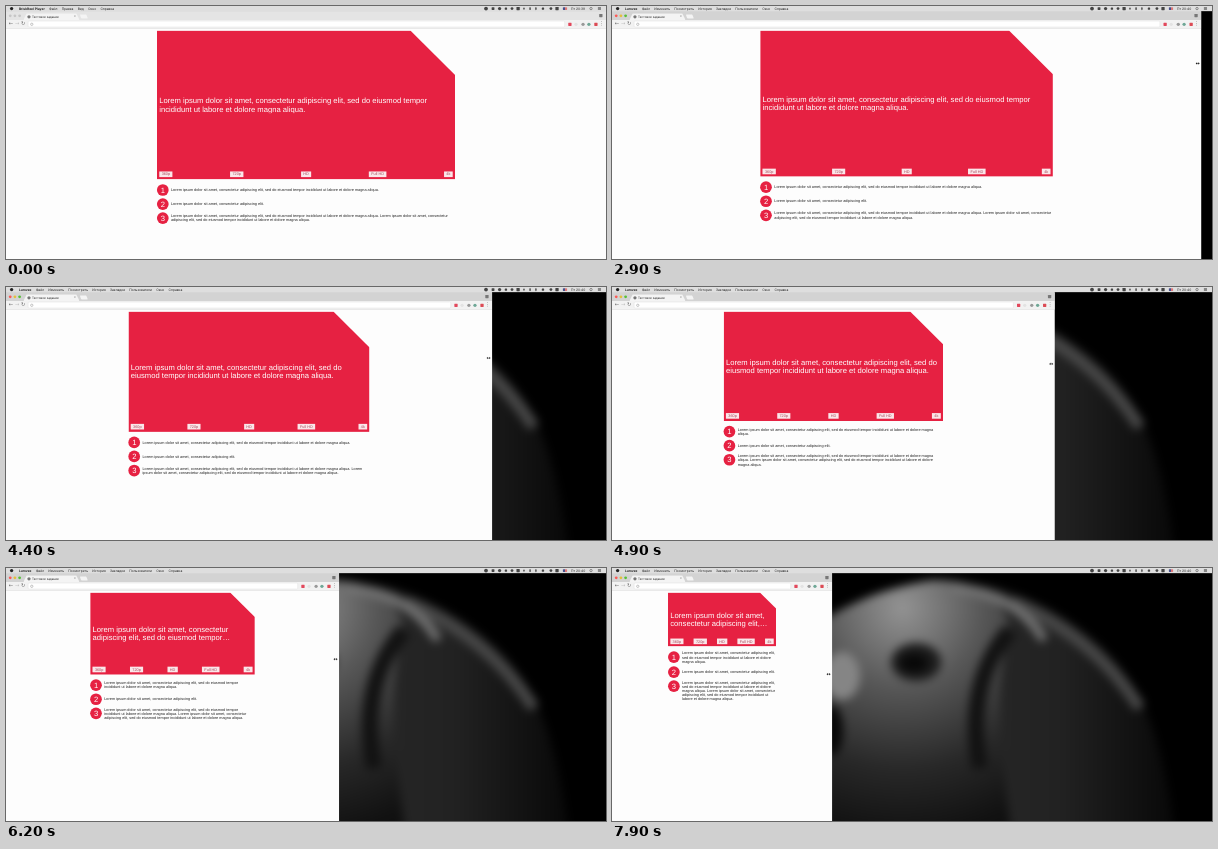
Recreate the animation shown at these times as an HTML page. Size 600x253 px, loop 8 s.

```html
<!DOCTYPE html>
<html lang="ru">
<head>
<meta charset="utf-8">
<style>
  html, body { margin: 0; width: 600px; height: 253px; overflow: hidden; background: #000; }
  /* The desktop is laid out at 2560 x 1080 and scaled down to the stage. */
  #desktop { position: absolute; width: 2560px; height: 1080px; transform: scale(.234375); transform-origin: 0 0;
    overflow: hidden; font: 14px/22px Inter, sans-serif; color: #222; text-rendering: geometricPrecision; }
  #desktop i { position: absolute; display: block; }
  #photo { position: absolute; width: 2560px; height: 1080px; }

  #menubar { position: absolute; width: 100%; height: 22px; background: #dedede; white-space: nowrap; }
  #menus { position: absolute; left: 55px; display: flex; gap: 18px; }
  #menus :first-child { font-weight: 700; }
  #clock { position: absolute; left: 2411px; }
  .dot { width: 14px; height: 14px; border-radius: 50%; transform: translate(-50%, -50%); }
  .square { border-radius: 2px; }

  #window { position: absolute; top: 22px; bottom: 0; background: #fdfdfd; overflow: hidden; }
  #tabs { position: relative; height: 38px; background: #e4e4e4; }
  .active #tabs { background: #d3d3d3; }
  #tabs .light { width: 12px; height: 12px; background: #c6c6c6; }
  .active #tabs .light { background: var(--c); }
  #tab, #plus { position: absolute; background: #f4f4f4; }
  #tab { left: 74px; top: 9px; width: 240px; height: 29px; clip-path: polygon(6% 0, 94% 0, 100% 100%, 0 100%); }
  #tab span { position: absolute; left: 37px; top: 4px; font-size: 13px; white-space: nowrap; }
  #tab b { position: absolute; right: 16px; top: 3px; font-weight: 400; color: #666; }
  #plus { left: 318px; top: 14px; width: 28px; height: 17px; transform: skewX(20deg); border-radius: 3px; }
  #tools { position: relative; height: 36px; background: #f2f2f2; border-bottom: 1px solid #b9b9b9; box-sizing: border-box;
    font: 22px/34px "DejaVu Sans", sans-serif; color: #666; }
  #tools span { position: absolute; }
  #address { position: absolute; left: 94px; right: 176px; top: 4px; height: 26px; background: #fff; border: 1px solid #ccc;
    box-sizing: border-box; border-radius: 4px; }
  #address i { left: 9px; top: 7px; width: 8px; height: 8px; border: 2px solid #888; border-radius: 50%; }

  #page { width: calc(50% - 8px); margin: 8px auto; font: 16.3px/18px "Liberation Sans", Arial, sans-serif; }
  #card { position: relative; aspect-ratio: 2; background: #e62142; margin-bottom: 20px;
    clip-path: polygon(0 0, 85% 0, 100% 30%, 100% 100%, 0 100%); }
  #card h1 { position: absolute; left: 10px; right: 10px; top: 50%; transform: translateY(-50%); margin: 0;
    font: 32.6px/36px "Liberation Sans", Arial, sans-serif; color: #fff;
    display: -webkit-box; -webkit-box-orient: vertical; -webkit-line-clamp: 2; overflow: hidden; }
  #sizes { position: absolute; left: 10px; right: 10px; bottom: 10px; display: flex; justify-content: space-between; }
  #sizes span { padding: 3px 10px; background: #fae6e9; color: #a9475a; white-space: nowrap; }
  .item { display: flex; gap: 10px; margin-bottom: 10px; color: #222; }
  .item b { flex: none; width: 50px; height: 50px; border-radius: 50%; background: #e62142; color: #fff;
    font: 32.6px/50px "Liberation Sans", Arial, sans-serif; text-align: center; }
  .item span { flex: 1; align-self: center; }
  #cursor { position: absolute; width: 20px; height: 13px; transform: translate(-50%, -50%); }
</style>
</head>
<body>
<div id="desktop">
  <svg id="photo" viewBox="0 0 600 253" preserveAspectRatio="none">
    <defs>
      <filter id="soft" x="-20%" y="-20%" width="140%" height="140%" color-interpolation-filters="sRGB"><feGaussianBlur stdDeviation="5"/></filter>
      <linearGradient id="back"><stop stop-color="#282828"/><stop offset=".5" stop-color="#222"/><stop offset="1" stop-color="#080808"/></linearGradient>
      <radialGradient id="head" gradientUnits="userSpaceOnUse" cx="290" cy="40" r="230">
        <stop stop-color="#939393"/><stop offset=".35" stop-color="#575757"/><stop offset=".7" stop-color="#282828"/><stop offset="1" stop-color="#101010"/>
      </radialGradient>
    </defs>
    <rect width="600" height="253"/>
    <g filter="url(#soft)" fill="none">
      <path fill="url(#back)" d="M330 12C390 14 445 40 484 74C526 110 550 160 564 270H330Z"/>
      <path stroke="#484848" stroke-width="12" d="M400 34Q482 68 528 140"/>
      <path fill="url(#head)" d="M190 65C225 42 260 22 320 12C370 12 395 35 398 62C382 110 388 180 400 270H190Z"/>
      <path stroke="#747474" stroke-width="9" d="M340 20Q405 25 432 72"/>
      <path stroke="#121212" stroke-width="16" d="M398 62Q352 115 368 200"/>
      <ellipse cx="230" cy="108" rx="18" ry="24" fill="#858585"/>
      <ellipse cx="304" cy="94" rx="25" ry="19" fill="#1c1c1c"/>
      <ellipse cx="302" cy="95" rx="14" ry="9" fill="#080808"/>
      <ellipse cx="220" cy="162" rx="11" ry="25" fill="#080808"/>
    </g>
  </svg>

  <div id="window">
    <div id="tabs">
      <div id="tab"><i class="dot" style="left:24px;top:15px;background:#777"></i><span>Тестовое задание</span><b>×</b></div>
      <div id="plus"></div>
    </div>
    <div id="tools">
      <span style="left:12px">←</span><span style="left:38px;color:#bbb">→</span><span style="left:64px">↻</span>
      <div id="address"><i></i></div>
      <span style="right:9px">⋮</span>
    </div>
    <div id="page">
      <div id="card"><h1></h1><div id="sizes"></div></div>
    </div>
  </div>

  <div id="menubar"><i class="dot" style="left:24px;top:11px;background:#222"></i><div id="menus"></div><span id="clock"></span></div>
  <svg id="cursor" viewBox="0 0 24 16"><path d="M1 8L9 1V6H15V1L23 8L15 15V10H9V15Z" stroke="#fff" stroke-width="1.5"/></svg>
</div>

<script>
const $ = id => document.getElementById(id);
const UNIT = 2560 / 600;
const LOOP = 8000, FOCUS_AT = 2400, CURSOR_AT = 1700, MINUTE_AT = 1000;

const start = 'Lorem ipsum dolor sit amet, consectetur adipiscing elit';
const full = start + ', sed do eiusmod tempor incididunt ut labore et dolore magna aliqua.';
document.querySelector('h1').textContent = full;
$('sizes').innerHTML = ['360p', '720p', 'HD', 'Full HD', '4k'].map(s => `<span>${s}</span>`).join('');
[full, start + '.', full + ' ' + full].forEach((text, i) =>
  $('page').insertAdjacentHTML('beforeend', `<div class="item"><b>${i + 1}</b><span>${text}</span></div>`));

const addDot = (parent, css, kind = '') =>
  $(parent).insertAdjacentHTML('beforeend', `<i class="dot ${kind}" style="${css}"></i>`);

['#fc5b57', '#e5bf3c', '#57c038'].forEach((c, i) => addDot('tabs', `left:${18 + 20 * i}px;top:20px;--c:${c}`, 'light'));
addDot('tabs', 'right:8px;top:19px;background:#777', 'square');
[[36, '#e2485c', 'square'], [30, '#e3e3e3'], [23, '#999'], [17, '#6fa796'], [10, '#dc4b55', 'square']].forEach(([x, color, kind]) =>
  addDot('tools', `left:calc(100% - ${x * UNIT}px);top:18px;background:${color}`, kind));

// Status icons of the menu bar
[480, 487, 493.5, 500, 506, 512, 518, 524, 530, 537, 545, 551].forEach((x, i) => {
  const size = i ? 10 + i % 3 * 2 : 16;
  addDot('menubar', `left:${x * UNIT}px;top:11px;height:${size}px;width:${i > 5 && i < 9 ? 6 : size}px;background:#444`, i % 2 ? 'square' : '');
});
addDot('menubar', `left:${559 * UNIT}px;top:11px;width:18px;height:12px;background:linear-gradient(90deg,#46508c 45%,#d77 45%)`, 'square');
addDot('menubar', `left:${585 * UNIT}px;top:11px;width:8px;height:8px;border:2px solid #333`);
[-5, 0, 5].forEach(dy => addDot('menubar', `left:${593.5 * UNIT}px;top:${11 + dy}px;height:2px;background:#333`, 'square'));

const menu = list => list.split(',').map(s => `<span>${s}</span>`).join('');
const playerMenu = menu('BriskReel Player,Файл,Правка,Вид,Окно,Справка');
const browserMenu = menu('Lumvex,Файл,Изменить,Посмотреть,История,Закладки,Пользователи,Окно,Справка');

// [time, window width] while the right edge is dragged
const drag = [[2500, 600], [3200, 581], [3700, 566], [4100, 531], [4400, 486], [5000, 434], [5400, 393.3],
  [5900, 357], [6800, 285], [7000, 272], [7700, 230], [7900, 220]];

function widthAt(t) {
  const next = drag.findIndex(p => p[0] >= t);
  if (next === 0) return 600;
  const [t0, w0] = drag[next - 1], [t1, w1] = drag[next];
  return w0 + (w1 - w0) * (t - t0) / (t1 - t0);
}

let shownActive;
function draw(now) {
  const t = Math.floor(now % LOOP / 100) * 100;
  const active = t >= FOCUS_AT, width = widthAt(t);
  if (active !== shownActive) {
    shownActive = active;
    $('menus').innerHTML = active ? browserMenu : playerMenu;
    $('window').classList.toggle('active', active);
  }
  $('clock').textContent = t < MINUTE_AT ? 'Пт 20:39' : 'Пт 20:40';
  $('window').style.width = width * UNIT + 'px';
  const cursor = $('cursor').style;
  cursor.visibility = t < CURSOR_AT ? 'hidden' : 'visible';
  cursor.left = (width - (active ? 3.5 : 1)) * UNIT + 'px';
  cursor.top = (60.5 + (566 - width) * .132) * UNIT + 'px';
  requestAnimationFrame(draw);
}
requestAnimationFrame(draw);
</script>
</body>
</html>
```
